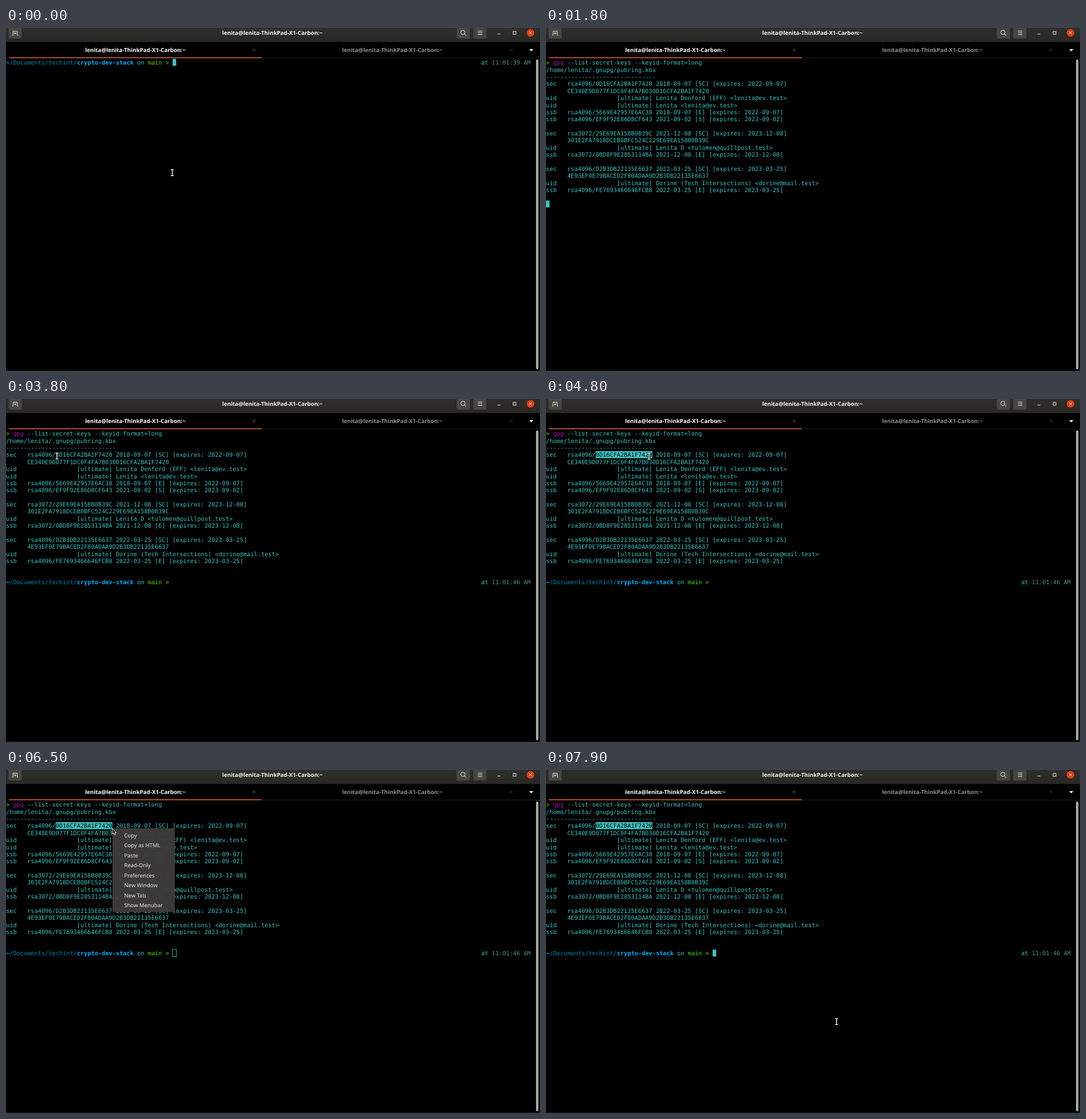
An HTML page for the animation above (8000 ms loop, 933 by 600 pixels).

```html
<!DOCTYPE html>
<html lang="en">
<head>
<meta charset="utf-8">
<title>Terminal</title>
<style>
  html, body { margin: 0; width: 100%; height: 100%; overflow: hidden; background: #000; }
  svg { display: block; width: 933px; height: 600px; }
  text { white-space: pre; text-rendering: geometricPrecision; }
  .mono { font: 10.29px "DejaVu Sans Mono", monospace; }
  .bold { font-weight: 700; }
  .ui { font: 700 9.75px "Noto Sans", sans-serif; text-anchor: middle; }
  .item { font: 9.5px "Noto Sans", sans-serif; fill: #f0f0ee; }
  .line { fill: none; stroke: #e8e8e6; }
</style>
</head>
<body>
<svg viewBox="0 0 933 600">
  <defs>
    <linearGradient id="bar" x2="0" y2="1">
      <stop offset="0" stop-color="#2f2e2b"/><stop offset="1" stop-color="#292825"/>
    </linearGradient>
  </defs>
  <rect width="933" height="600"/>
  <rect width="933" height="24" fill="url(#bar)"/>
  <rect y="24" width="933" height="1" fill="#161614"/>

  <g fill="#474642" stroke="#201f1d" stroke-width=".6">
    <rect x="4" y="-4" width="24" height="23" rx="3"/>
    <rect x="787" y="-4" width="24" height="23" rx="3"/>
    <rect x="816" y="-4" width="24" height="23" rx="3"/>
  </g>
  <g class="line">
    <path d="M10.8 12.5H12.3V5.7H19.7V12.5H21.2M16 7.3V11.3M14 9.3H18"/>
    <circle cx="798.3" cy="7.6" r="3.7"/>
    <path d="M801 10.3L804 13.2"/>
    <path d="M824.6 5.5H832M824.6 8.5H832M824.6 11.5H832"/>
    <path d="M858.7 10.5H863.8"/>
    <rect x="886" y="6" width="5" height="5"/>
  </g>
  <circle cx="916.4" cy="8.4" r="6.7" fill="#d93e12"/>
  <path class="line" d="M914 6L918.8 10.8M918.8 6L914 10.8"/>

  <g class="ui">
    <text x="465.5" y="11.8" fill="#f2f2f0">lenita@lenita-ThinkPad-X1-Carbon:~</text>
    <text x="226" y="41.8" fill="#fff">lenita@lenita-ThinkPad-X1-Carbon:~</text>
    <text x="675" y="41.8" fill="#91918f">lenita@lenita-ThinkPad-X1-Carbon:~</text>
  </g>
  <path d="M431 36L436 41M436 36L431 41" stroke="#656562"/>
  <path d="M880 36L885 41M885 36L880 41" stroke="#3a3a38"/>
  <path d="M914 37H921.4L917.7 40.8Z" fill="#fff"/>
  <rect y="52" width="933" height="1" fill="#20201e"/>
  <rect x="5" y="51" width="442" height="2" fill="#b04a2e"/>

  <rect x="926" y="55" width="4.2" height="542" rx="2.1" fill="#a9a8a4"/>
  <rect x="932" y="53" width="1" height="547" fill="#1c1c1a"/>
  <rect y="599" width="933" height="1" fill="#1c1c1a"/>
  <g id="screen"></g>
</svg>
<script>
const CW = 6.195, LH = 2 * CW, TOP = 54, BASE = 10.2, LOOP = 8000, STEP = 100;
const FG = "#40c2c0", GREEN = "#5fd700", DIR = "#0087af", ANCHOR = "#00afff",
      TIME = "#5f8787", CMD = "#a318a8", GHOST = "#5c6464";
const FLAGS = " --list-secret-keys --keyid-format=long";
const PROMPT_COL = 47, KEY_COL = 14, KEY_END = 30, KEY_ROW = 3;

const uid = who => "uid" + " ".repeat(17) + "[ultimate] " + who;
const OUTPUT = [
  "/home/lenita/.gnupg/pubring.kbx",
  "-".repeat(31),
  "sec   rsa4096/0D16CFA2BA1F7420 2018-09-07 [SC] [expires: 2022-09-07]",
  "      CE340E9D077F1DC0F4FA7B030D16CFA2BA1F7420",
  uid("Lenita Denford (EFF) <lenita@ev.test>"),
  uid("Lenita <lenita@ev.test>"),
  "ssb   rsa4096/5669E42957E6AC38 2018-09-07 [E] [expires: 2022-09-07]",
  "ssb   rsa4096/EF9F92E86D8CF643 2021-09-02 [S] [expires: 2023-09-02]",
  "",
  "sec   rsa3072/29E69EA158B0B39C 2021-12-08 [SC] [expires: 2023-12-08]",
  "      301E2FA7918DCEB0BFC524C229E69EA158B0B39C",
  uid("Lenita D <tulomen@quillpost.test>"),
  "ssb   rsa3072/0BD8F9E2853114BA 2021-12-08 [E] [expires: 2023-12-08]",
  "",
  "sec   rsa4096/D2B3DB22135E6637 2022-03-25 [SC] [expires: 2023-03-25]",
  "      4E93EF0E79BACED2F80ADAA9D2B3DB22135E6637",
  uid("Dorine (Tech Intersections) <dorine@mail.test>"),
  "ssb   rsa4096/FE7693466646FCB8 2022-03-25 [E] [expires: 2023-03-25]"
];
const MENU = ["Copy", "Copy as HTML", "Paste", "Read-Only", "Preferences",
              "New Window", "New Tab", "Show Menubar"];

// Pointer moves: first step, last step, x, y on arrival
const MOVES = [
  [0, 0, 290.5, 253], [2000, 2300, 48, 186], [2500, 2500, 46, 184.3], [2600, 2700, 91, 113],
  [3000, 3200, 91, 104], [3400, 3500, 91, 101], [3700, 3900, 88, 99], [4100, 4600, 175, 99],
  [4800, 4800, 180, 100], [5000, 5000, 184, 107], [5500, 5500, 185, 102.5],
  [5700, 5700, 185.5, 102], [6700, 6700, 188, 98], [6800, 7400, 214, 113], [7800, 7900, 507.7, 440]
];
// Moments at which the text cursor toggles, starting visible
const BLINKS = [1500, 1700, 2500, 3000, 3500, 4200, 4800, 5500];

const between = (t, a, b) => t >= a && t < b;
const rowY = row => TOP + row * LH;
const esc = s => s.replace(/&/g, "&amp;").replace(/</g, "&lt;").replace(/>/g, "&gt;");

function put(row, col, s, fill = FG, bold = false) {
  return `<text class="mono${bold ? " bold" : ""}" x="${col * CW}" y="${rowY(row) + BASE}" fill="${fill}">${esc(s)}</text>`;
}

function prompt(row, clock) {
  return put(row, 0, "~", ANCHOR, true) + put(row, 1, "/Documents/techint/", DIR) +
    put(row, 20, "crypto-dev-stack", ANCHOR, true) + put(row, 37, "on") +
    put(row, 40, "main", GREEN) + put(row, 45, ">", GREEN) +
    put(row, 134, "at") + put(row, 137, clock, TIME);
}

function block(row, col) {
  return `<rect x="${col * CW}" y="${rowY(row)}" width="${CW}" height="12" fill="${FG}"/>`;
}

function select(row, from, to, right = to * CW) {
  const s = OUTPUT[row - 1].slice(from, to), x = from * CW;
  return `<rect x="${x}" y="${rowY(row)}" width="${right - x}" height="${LH}" fill="${FG}"/>` +
    put(row, from, s, "#000");
}

function pointerAt(t) {
  let [, , x, y] = MOVES[0];
  for (const [a, b, px, py] of MOVES) {
    if (t < a) break;
    const u = Math.min(1, (t - a + STEP) / (b - a + STEP));
    x += (px - x) * u;
    y += (py - y) * u;
  }
  return [x, y];
}

function selection(t, x, y) {
  if (t < 4100) return "";
  if (y > rowY(KEY_ROW + 1) && t < 5500)
    return select(KEY_ROW, KEY_COL, 80, 924) + select(KEY_ROW + 1, 0, Math.round(x / CW));
  const end = t < 5000 ? Math.ceil(x / CW) : KEY_END;
  return select(KEY_ROW, KEY_COL, Math.min(end, KEY_END));
}

function menu(t) {
  const fade = t < 6500 ? 0.75 : t < 6700 ? 0.96 : 1;
  const hover = t >= 6900
    ? '<rect x="187" y="105.5" width="107" height="17.4" fill="#55544f"/>' : "";
  return `<g opacity="${fade}"><rect x="186.6" y="102.3" width="107.8" height="145.6" fill="#3d3c38" stroke="#4a4945" stroke-width=".8"/>` +
    hover + MENU.map((s, i) => `<text class="item" x="206.5" y="${117.6 + i * 17.5}">${s}</text>`).join("") + "</g>";
}

function ibeam(x, y) {
  const d = "M-2.5 -5.2H-.7L0 -4.5L.7 -5.2H2.5M0 -4.5V4.5M-2.5 5.2H-.7L0 4.5L.7 5.2H2.5";
  return `<g transform="translate(${x} ${y})" fill="none"><path d="${d}" stroke="#000" stroke-width="2.8"/>` +
    `<path d="${d}" stroke="#f4f4f4" stroke-width="1.4"/></g>`;
}

function arrow(x, y) {
  return `<path transform="translate(${x} ${y})" d="M.4 .5V10L2.7 8L4.2 11.5L5.9 10.7L4.4 7.4H7.3Z" fill="#111" stroke="#fff" stroke-width=".9"/>`;
}

function frame(t) {
  const [x, y] = pointerAt(t);
  const lit = BLINKS.filter(b => t >= b).length % 2 === 0;
  const unfocused = between(t, 6200, 7800), popup = between(t, 6300, 7800);
  let out = "", row = 0, col = PROMPT_COL;

  if (t < 1800) {
    const typed = t < 500 ? 0 : Math.min(3, (t - 500) / STEP + 1);
    const done = t >= 1700;
    out += prompt(0, "11:01:39 AM") + put(0, col, "gpg".slice(0, typed), CMD);
    if (typed) out += put(0, col + typed, "gpg".slice(typed) + FLAGS, done ? FG : GHOST);
    col += done ? 3 + FLAGS.length : typed;
  } else {
    out += put(0, 0, ">", GREEN) + put(0, 2, "gpg", CMD) + put(0, 5, FLAGS);
    out += OUTPUT.map((s, i) => put(i + 1, 0, s)).join("");
    if (t < 2000) { row = 20; col = 0; }
    else { row = 21; out += prompt(row, "11:01:46 AM"); }
  }

  out += selection(t, x, y);
  if (unfocused) out += `<rect x="290.9" y="${rowY(row) - .4}" width="7" height="12.8" fill="none" stroke="${FG}" stroke-width=".9"/>`;
  else if (lit) out += block(row, col);

  if (popup) out += menu(t) + arrow(x, y);
  else if (!between(t, 500, 2000)) out += ibeam(x, y);
  return out;
}

const layer = document.getElementById("screen");
let shown = -1;
function tick(now) {
  const t = Math.floor((now % LOOP) / STEP) * STEP;
  if (t !== shown) {
    shown = t;
    layer.innerHTML = frame(t);
  }
  requestAnimationFrame(tick);
}
tick(performance.now());
</script>
</body>
</html>
```
